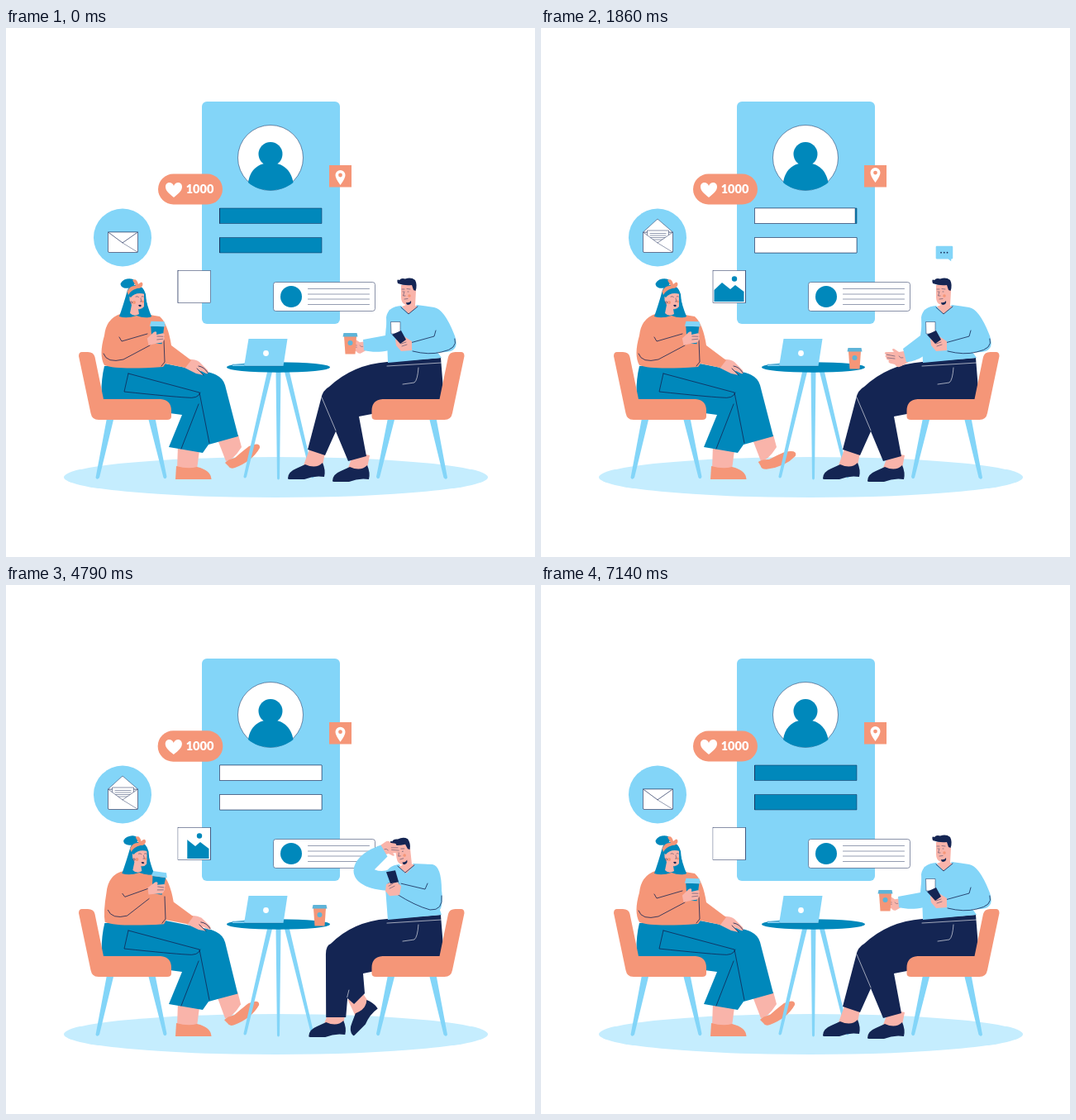
Recreate the animation shown at these times as an HTML page. Size 640 px wide and 640 px high, loop 7210 ms.

```html
<!DOCTYPE html>
<html lang="en">
<head>
<meta charset="utf-8">
<title>Coffee chat</title>
<style>
html, body { margin: 0; height: 100%; overflow: hidden; background: #fff; }
svg { display: block; width: 100vw; height: 100vh; }
.light { fill: #83d5f8; }
.blue { fill: #0088bb; }
.coral { fill: #f59678; }
.skin { fill: #f9b4aa; }
.navy { fill: #142553; }
.white { fill: #fff; }
.edge { stroke: #142553; stroke-width: .5; }
.ink, .chalk { fill: none; stroke: #142553; stroke-width: .8; stroke-linecap: round; stroke-linejoin: round; }
.fine { stroke-width: .45; }
.chalk { stroke: #fff; stroke-width: .6; }
text { font: 900 14.5px Lato, "Open Sans", sans-serif; text-anchor: middle; }
</style>
</head>
<body>
<svg viewBox="0 0 640 640">
<defs>
  <clipPath id="pocket"><path d="M123 225H160V271H123Z"/></clipPath>
  <g id="chair">
    <path class="light" d="M122 472H130.500L113 544Q110 547.500 108.500 544ZM172 472H180.500L194.500 543Q193 547 190.500 544Z"/>
    <path class="coral" d="M92 392H99Q106 392 107.500 398L118 449H187Q200 450 200 463V470Q200 474 195 474H112Q104 474 102.500 466L88 397Q88 392 92 392Z"/>
  </g>
  <g id="shoe">
    <path class="skin" d="M-15 1L-8 -18L11 -14L8 1Q-2 8 -15 1Z"/>
    <path class="navy" d="M-34 17Q-34 9 -24 5L-13 0Q0 6 8 -2Q12 7 10 15Q-2 13 -14 18H-32Q-34 18 -34 17Z"/>
  </g>
</defs>

<ellipse cx="326.500" cy="543.500" rx="256.500" ry="24.500" fill="#c5edfe"/>

<!-- profile panel -->
<rect class="light" x="237" y="89" width="167" height="269" rx="6"/>
<circle class="white edge" cx="320" cy="157" r="39.500"/>
<circle class="blue" cx="320" cy="152.500" r="14.500"/>
<path class="blue" d="M293 187C295 172 305 163 320 163S345 172 347.500 187C340 193 330 196.500 320 196.500S300 193 293 187Z"/>
<path class="blue edge" d="M258.500 218H382V236.500H258.500ZM258.500 253.500H382V272H258.500Z"/>
<path class="white edge" data-track="barTop" data-a="M258.5 218H258.5V236.5H258.5Z" data-b="M258.5 218H382V236.5H258.5Z"/>
<path class="white edge" data-track="barLow" data-a="M258.5 253.5H258.5V272H258.5Z" data-b="M258.5 253.5H382V272H258.5Z"/>

<!-- badges -->
<g data-track="pulse" data-a="translate(223 195) scale(1)" data-b="translate(223 195) scale(1.2)">
  <rect class="coral" x="-39" y="-18.500" width="78" height="37" rx="18.500"/>
  <path class="white" d="M-20 10C-26 5 -30 2 -30 -3C-30 -9 -22 -10 -20 -4C-18 -10 -10 -9 -10 -3C-10 2 -14 5 -20 10Z"/>
  <text class="white" x="11.500" y="5">1000</text>
</g>
<rect class="coral" x="391" y="166" width="27" height="26.500"/>
<g id="pin">
  <path class="white" d="M404.500 190Q398.500 182 398.500 178A6 6 0 0 1 410.500 178Q410.500 182 404.500 190Z"/>
  <circle class="coral" cx="404.500" cy="178" r="2.400"/>
</g>

<circle class="light" cx="141" cy="253.500" r="35"/>
<rect class="white edge" x="123.500" y="247" width="36" height="24.500" rx="1.500"/>
<path class="white edge" data-track="mail" data-a="M123.5 247L141 260L159.5 247Z" data-b="M123.5 247L141 231L159.5 247Z"/>
<g clip-path="url(#pocket)">
  <g data-track="mail" data-a="translate(0 17)" data-b="translate(0 0)">
    <path class="white edge" d="M128.500 245H154.500V262H128.500Z"/>
    <path class="ink fine" d="M132 248.500H151M132 251H151M132 253.500H151M134 256H149"/>
  </g>
</g>
<path class="white edge" d="M123.500 247L141 260L159.500 247V270Q159.500 271.500 158 271.500H125Q123.500 271.500 123.500 270Z"/>
<path class="ink fine" d="M141 260L159 271"/>

<rect class="white edge" x="208" y="293.500" width="39.500" height="39"/>
<path class="blue" d="M209.500 331V317L219 308L229 316L235 311L245.500 319V331Z"/>
<circle class="blue" cx="234" cy="303.500" r="3.200"/>
<path class="white" data-track="photo" data-a="M208.5 294H247V332H208.5Z" data-b="M208.5 294H208.5V332H208.5Z"/>
<path class="ink fine" data-track="slide" data-a="M208 293.5V332.5" data-b="M247.5 293.5V332.5"/>

<rect class="white edge" x="323.500" y="307.500" width="123" height="35" rx="3"/>
<circle class="blue" cx="345" cy="325" r="13"/>
<path class="ink fine" d="M365.500 315.500H439.500M365.500 322H439.500M365.500 328H439.500M365.500 334.500H439.500"/>

<g data-track="bubble" data-a="translate(496 282) scale(0)" data-b="translate(496 282) scale(1)">
  <path class="light" d="M-46 -48.500H3Q6 -48.500 6 -45.500V-10Q6 -7 3 -7H0.500V1L-9 -7H-46Q-49 -7 -49 -10V-45.500Q-49 -48.500 -46 -48.500Z"/>
  <g class="navy"><circle cx="-32" cy="-27.500" r="2.300"/><circle cx="-22" cy="-27.500" r="2.300"/><circle cx="-12" cy="-27.500" r="2.300"/></g>
</g>

<!-- woman -->
<path class="skin" d="M208 505L234 511L231 534H207Z"/>
<path class="coral" d="M206 530Q220 534 231 531Q248 535 248.500 546H205Z"/>
<path class="skin" data-track="woman" data-a="M256 498L281 492L285 507Q275 523 266 524Z" data-c="M249 498L272 494L274 511Q264 527 255 528Z"/>
<g data-track="toe" data-a="translate(272 516) rotate(0)" data-b="translate(272 517) rotate(14)" data-c="translate(261 520) rotate(0)">
  <path class="coral" d="M-7 10Q-4 6 5 4Q14 -4 22 -10Q36 -16 35 -8Q26 8 5 16Q-1 18 -3 14Z"/>
</g>
<path class="blue" data-track="woman"
  data-a="M119 409L192 406L238 415Q261 418 265 432L281 494L245 504L238 514L197 507L213 468L116 455Q114 430 119 409Z"
  data-c="M123 409L202 406L238 415Q264 418 266 434L273 499L246 503L238 514L197 507L213 468L118 455Q117 430 123 409Z"/>
<path class="ink" d="M148 418L143 440Q200 446 218 447Q233 449 235 441M148 418L234 441L246 502M233 455L212 509"/>
<g data-track="woman" data-a="translate(220 406) rotate(0)" data-b="translate(222 406) rotate(0)" data-c="translate(253 396) rotate(-15)">
  <path class="skin" d="M-2 -5Q8 -6 14 -2L24 8Q26 13 22 12L14 8L19 14L10 12L-4 5Z"/>
  <path class="ink" d="M13 3Q20 4 24 11M11 6L19 14"/>
</g>
<path class="coral" data-track="woman"
  data-a="M138 346Q121 352 119 372Q112 396 119 408Q135 414 190 410L193 406L217 411L224 402L200 384Q196 358 186 349L168 346Z"
  data-b="M146 346Q125 348 122 368Q119 398 119 408Q135 414 192 410L194 406L219 411L226 402L202 385Q198 358 189 349L172 346Z"
  data-c="M158 346Q132 350 128 370Q123 392 127 404Q150 414 202 412L204 397L252 403L254 390L222 378Q212 352 204 349L188 346Z"
  data-d="M141 346Q123 350 121 372Q117 396 119 408Q135 414 190 410L193 406L217 411L224 402L201 384Q197 358 187 349L170 346Z"/>
<path class="ink" data-track="woman"
  data-a="M137 374L140 379L171 370M118 394Q122 406 142 401L174 384M191 378L192 404L188 409"
  data-b="M148 373L151 377L181 357M141 397Q152 403 164 394L187 359M193 359L193 405L189 410"
  data-c="M150 377L153 381L179 383M126 386Q130 404 152 402L185 396M203 388L204 404L199 411"
  data-d="M140 373L143 377L171 366M123 394Q128 405 146 400L172 378M191 376L192 404L188 409"/>
<g data-track="woman" data-a="translate(0 0) rotate(0 156 335)" data-b="translate(6 0) rotate(4 156 335)" data-c="translate(19 1) rotate(5 156 335)" data-d="translate(2 0) rotate(0 156 335)">
  <ellipse class="blue" cx="147.500" cy="309" rx="9" ry="5.500" transform="rotate(-12 147.500 309)"/>
  <path class="blue" d="M147 317Q142 335 137 349Q146 352 158 348Q168 352 176 349Q170 340 169 322Q166 311 156 311Q149 311 147 317Z"/>
  <path class="skin" d="M150 321Q158 315 167 320L168 329L167 337Q164 341 160 340L161 346Q155 350 150 345L152 335Q148 330 150 321Z"/>
  <path class="blue" d="M148 324Q151 314 160 315Q168 316 168 322Q157 319 151 326Z"/>
  <path class="blue" d="M167 319Q171 337 176 349Q170 352 164 348Q167 342 167 337Z"/>
  <path class="coral" d="M146.500 319Q150 311 157 312L153 305Q158 302 160 310Q165 305 165.500 310Q165 315 159 315Q151 317 148 323Z"/>
  <circle cx="155" cy="332" r="2" class="coral"/>
  <circle cx="165.500" cy="331" r="1.500" class="coral"/>
  <circle cx="151.500" cy="332" r="1.200" fill="none" stroke="#142553" stroke-width=".5"/>
  <path class="ink fine" d="M157 325Q159 324 160.500 325.500M164 325Q165.500 324 166.500 325M163 327L164 331H162.500"/>
  <path class="navy" d="M160 335.500Q162.500 334 164 336Q162 338.500 160 335.500Z"/>
</g>
<g data-track="woman" data-a="translate(183 370) rotate(2)" data-b="translate(179 340) rotate(-32)" data-c="translate(197 384) rotate(3)" data-d="translate(183 360) rotate(8)">
  <path class="blue" d="M-8 -9H8L6 12H-6Z"/>
  <path class="light" d="M-8 -15H8L9.500 -9H-9.500Z"/>
</g>
<g data-track="woman" data-a="translate(183 370) rotate(2)" data-b="translate(180 345) rotate(-55)" data-c="translate(197 384) rotate(3)" data-d="translate(183 360) rotate(8)">
  <path class="skin" d="M-12 6L-4 -2Q0 -4 -1 1L7 -1Q10 0 8 3Q10 5 8 7Q8 11 3 11L-10 14Z"/>
  <path class="ink fine" d="M0 3L7 3M0 7L7 6"/>
</g>
<use href="#chair"/>

<!-- table -->
<path class="light" d="M316.500 414H322.500L291 543Q289 546 287.400 543ZM326.500 414H332.500L331 545Q329.500 548 328 545ZM336.500 414H342.500L372.500 543Q371 546 369 543Z"/>
<ellipse class="blue" cx="329.500" cy="410.500" rx="62.500" ry="6.300"/>
<path class="light" d="M293.500 376H340.500L335.500 409H274V406.500H288.500Z"/>
<path class="ink fine" d="M274 407.500H288L289 409H335" stroke-opacity=".5"/>
<circle class="white" cx="314.500" cy="393.500" r="3.400"/>

<!-- man -->
<g data-track="legs" data-a="translate(429 531) rotate(0)" data-b="translate(436 534) rotate(0)" data-e="translate(432 509) rotate(-45)" data-f="translate(436 505) rotate(-45)"><use href="#shoe"/></g>
<g data-track="legs" data-a="translate(375 528) rotate(0)" data-b="translate(366 531) rotate(10)" data-e="translate(400 529) rotate(0)" data-f="translate(436 534) rotate(0)"><use href="#shoe"/></g>
<path class="navy" data-track="legs"
  data-a="M461 404Q420 407 391 434Q383 438 381 449L365 510L386 517L399 488L414 524L436 518L427 470L530 450L526 399Z"
  data-b="M455 412Q418 412 384 439Q374 444 377 457L360 512L383 517L394 487L417 525L439 519L424 471L527 449L519 398Z"
  data-e="M461 404Q420 407 393 434Q387 436 387 447L387 523L411 523L413 500L421 507L434 494L432 470L530 450L526 399Z"
  data-f="M455 412Q418 412 384 439Q372 446 377 460L414 525L440 516L432 497L434 511L438 507L433 470L527 449L519 398Z"/>
<path class="chalk" data-track="legs"
  data-a="M382 447L399 487M461 409L527 405M499 411Q498 426 494 429L480 431"
  data-b="M377 456L400 497M455 417L520 404M490 411Q492 426 488 429L474 433"
  data-e="M413 499L415 490M461 409L527 405M499 411Q498 426 494 429L480 431"
  data-f="M377 459L404 502M455 417L520 404M490 411Q492 426 488 429L474 433"/>
<path class="light" data-track="man"
  data-a="M478 336Q462 337 460 350L462 405L527 399L522 392C545 394 548 385 542 370Q530 340 518 338L497 335L487 345Z"
  data-b="M460 344Q447 345 446 360L455 412L520 399L516 392C538 394 541 385 535 370Q520 338 508 339L481 340L467 349Z"
  data-d="M476 338Q462 339 458 352L462 405L527 399L525 393C528 390 528 375 527 370Q527 340 516 338L493 337L482 348Z"/>
<g data-track="man" data-a="translate(0 0) rotate(0 487 335)" data-b="translate(-17 7) rotate(-17 487 335)" data-d="translate(-4 3) rotate(-9 487 335)">
  <path class="skin" d="M478 311H494L496 318L495 336L498 337L487 346L479 337L484 335Q478 333 478 326Z"/>
  <path class="navy" d="M474 309Q472 303 476 305Q478 302 483 303.500Q490 301 495 305Q498 311 495.500 318L493 317L491 311Q482 312 474 309Z"/>
  <path class="navy" d="M484 332Q488 333 490 330Q491 334.500 486 335Q484 334.500 484 332Z"/>
  <circle class="coral" cx="488" cy="324" r="1.800"/>
  <path class="ink fine" d="M479 316H482M485 315.500L489 316M480 319H481M486 319H487M482 319L480.500 324H483M482 328L486 327.500"/>
</g>
<g data-track="man"
  data-a="translate(434 384) rotate(0) scale(.75)" data-b="translate(399 397) rotate(0) scale(.75)"
  data-c="translate(441 397) rotate(0) scale(1)" data-d="translate(435 334) rotate(90) scale(1)"
  data-e="translate(456 321) rotate(175) scale(.85)">
  <path class="skin" d="M4 -7L-8 -5L-14 -9Q-18 -9 -14 -5L-24 -5Q-27 -3 -23 -2Q-26 0 -23 2Q-24 4 -20 5Q-22 8 -17 9L-13 10Q-10 15 -5 12L4 7Z"/>
  <path class="ink fine" d="M-23 -2L-13 0M-22 2L-13 3M-8 0Q-6 3 -3 2"/>
</g>
<path class="light" data-track="man"
  data-a="M464 340Q460 355 459 372L432 377L433 390C445 393 460 393 478 385Z"
  data-b="M452 346Q437 352 420 376L394 388L398 405C420 402 440 395 470 370Z"
  data-c="M464 340Q461 355 459 372L438 388L442 404C450 404 462 400 478 385Z"
  data-d="M464 344Q456 352 446 352L444 331L427 333C423 372 424 390 466 367Z"
  data-e="M464 344Q455 348 446 344L462 328L454 314C410 328 405 368 466 370Z"/>
<path class="ink" data-track="man"
  data-a="M478 338L487 346L498 337M520 366L518 373L489 381M492 391Q512 396 527 392Q547 388 543 376"
  data-b="M460 346L469 351L483 341M512 366L509 373L484 386M488 395Q508 397 522 392Q541 388 536 373"
  data-d="M474 340L483 348L494 339M510 361L507 368L478 361M473 374Q495 388 513 393Q529 394 527 376"/>
<path class="white edge" data-track="man"
  data-a="M465.5 355.5L477 355.5L477 370L466 370Z"
  data-b="M453 364L465 363L467 376L458 380Z"
  data-d="M462 361L474 358L477 366L468 370Z"/>
<path class="skin" data-track="man"
  data-a="M471 377L480 372L491 379L491 390L478 391L472 384Z"
  data-b="M463 388L472 381L484 386L487 397L473 399L465 395Z"
  data-d="M460 362L470 357L478 364L476 375L464 376L459 370Z"/>
<path class="navy" data-track="man"
  data-a="M467 371L478 366L484 377L477 382Z"
  data-b="M461 380L471 376L481 386L473 391Z"
  data-d="M460 347L471 345L475 359L465 361Z"/>
<path class="ink fine" data-track="man"
  data-a="M478 382L484 380M479 385L485 383"
  data-b="M470 391L477 389M472 394L478 391"
  data-d="M463 364L468 361M464 367L470 364"/>
<use href="#chair" transform="translate(642.500) scale(-1 1)"/>
<g data-track="man" data-a="translate(416.5 382) rotate(0)" data-b="translate(380 399) rotate(-4)" data-c="translate(379.5 400) rotate(0)" data-d="translate(379.5 400) rotate(0)">
  <path class="coral" d="M-7.500 -9H7.500L6 12.500H-6Z"/>
  <path d="M-8 -13H8L9 -8.500H-9Z" fill="#5fb4d8"/>
  <circle cx="0" cy="-1" r="3" fill="#5fb4d8"/>
</g>
</svg>

<script>
const LOOP = 7210, STEPS = 101, HALF = LOOP / 2;

// Each track: period, then pose keys with the time they are reached.
const tracks = {
  woman:  [LOOP, "a100 b500 b1000 a1500 a2400 d2560 d4650 c5400 c6350 a7000"],
  toe:    [LOOP, "a100 b450 b2100 a2450 a4650 c5400 c6350 a7000"],
  man:    [LOOP, "a70 b540 b950 c1500 c1950 d2500 d3200 e3720 e4750 f5400 f5680 a6300"],
  legs:   [LOOP, "a70 b540 b950 a1500 a2700 e3350 e4750 f5400 f5900 a6950"],
  bubble: [LOOP, "a1690 b2090 b4100 a4600"],
  barTop: [HALF, "a0 b750 b1800 a2560"],
  barLow: [HALF, "a270 b1020 b2075 a2825"],
  mail:   [HALF, "a200 b520 b2100 a2500"],
  photo:  [HALF, "a950 b1300 b2900 a3300"],
  slide:  [HALF, "a0 b270"],
  pulse:  [LOOP / 4, "a240 b700 a1250"]
};
const fallback = { e: "d", f: "b" };
const number = /-?\d*\.?\d+/g;
const smooth = x => x * x * (3 - 2 * x);

for (const name in tracks) {
  const [period, keys] = tracks[name];
  tracks[name] = { period, keys: keys.split(" ").map(k => ({ pose: k[0], at: +k.slice(1) })) };
}

function sample({ period, keys }, time) {
  const t = time % period;
  const next = keys.findIndex(k => k.at > t);
  if (next === 0) return [keys[0].pose, keys[0].pose, 0];
  if (next < 0) return [keys.at(-1).pose, keys.at(-1).pose, 0];
  const from = keys[next - 1], to = keys[next];
  return [from.pose, to.pose, smooth((t - from.at) / (to.at - from.at))];
}

function blend(from, to, amount) {
  if (!amount || from === to) return from;
  const ends = to.match(number);
  let i = 0;
  return from.replace(number, n => +(+n + (ends[i++] - n) * amount).toFixed(3));
}

const parts = [...document.querySelectorAll("[data-track]")];
const pin = document.getElementById("pin");
const shape = (part, pose) => part.dataset[pose] ?? part.dataset[fallback[pose]] ?? part.dataset.a;

function draw(now) {
  // The small offset absorbs step times rounded down to 10 ms.
  const step = Math.floor(now % LOOP / LOOP * STEPS + .1) % STEPS;
  const time = step * LOOP / STEPS;
  for (const part of parts) {
    const [from, to, amount] = sample(tracks[part.dataset.track], time);
    part.setAttribute(part.tagName === "path" ? "d" : "transform",
      blend(shape(part, from), shape(part, to), amount));
  }
  const hop = Math.abs(Math.sin(Math.PI * 9 * time / LOOP)) * 3.5;
  pin.setAttribute("transform", `translate(0 ${-hop})`);
}

const start = performance.now();
function tick() {
  draw(performance.now() - start);
  requestAnimationFrame(tick);
}
tick();
</script>
</body>
</html>
```
